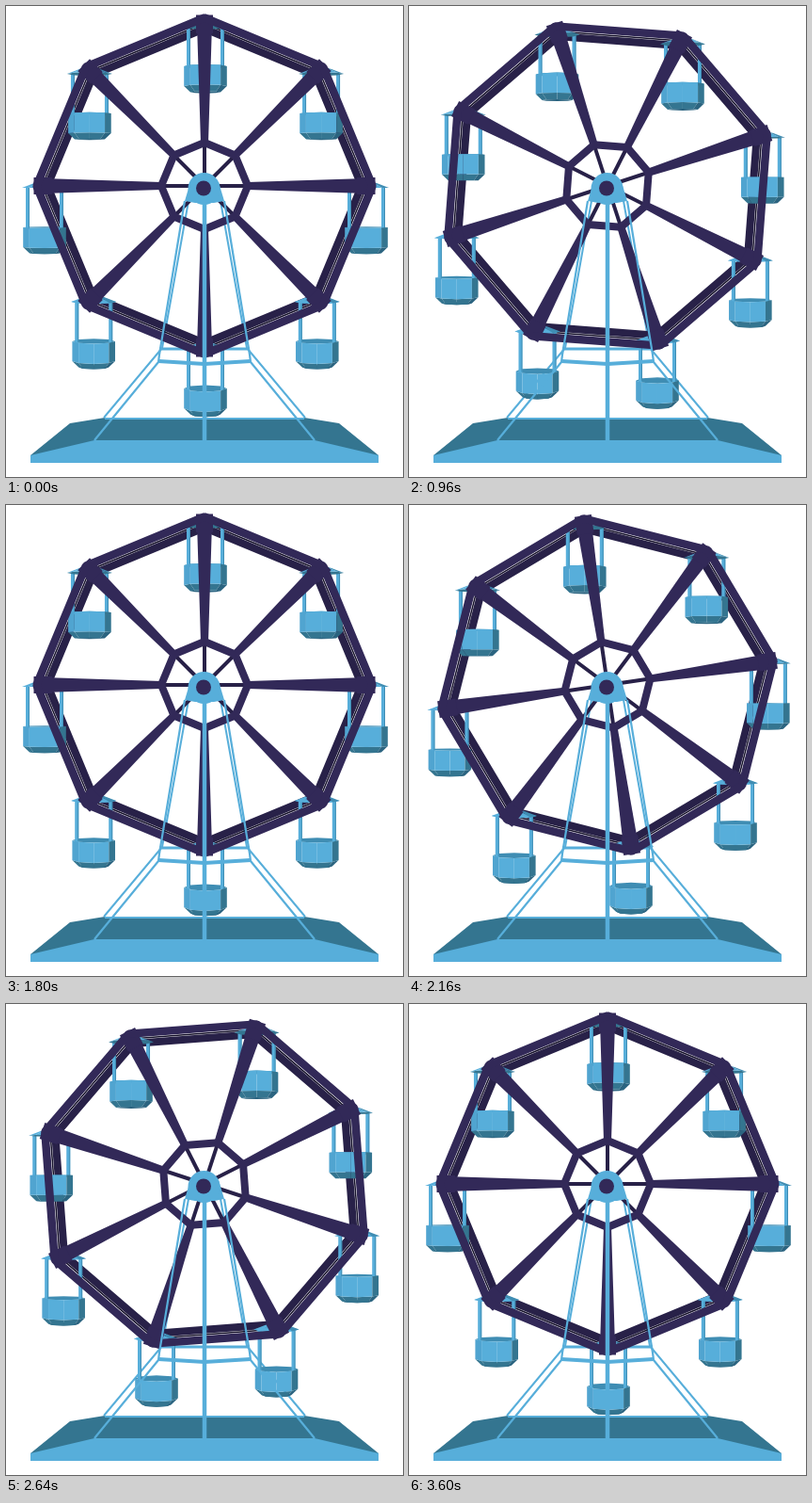
These frames come from a looping animation (422 px wide and 500 px high, 3660 ms). An HTML page with a canvas:

```html
<!DOCTYPE html>
<html lang="en">
<head>
<meta charset="utf-8">
<title>Ferris wheel</title>
<style>
  html, body { margin: 0; width: 100%; height: 100%; overflow: hidden; background: #fff; }
  canvas { display: block; }
</style>
</head>
<body>
<canvas id="stage" width="422" height="500"></canvas>
<script>
const ctx = document.getElementById('stage').getContext('2d');
const LOOP = 3660, STEP = 60, TURN = 3600;
const CX = 211, CY = 191, EYE = 192, DEPTH = 1400;
const PURPLE = '#322958', SHADE = '#282148', INK = '#15112a';
const SKY = '#57aeda', SIDE = '#50a4d0', TEAL = '#347590', DEEP = '#2b6480', INNER = '#3f8db3';

function trace(points, closed) {
  ctx.beginPath();
  points.forEach(([x, y]) => ctx.lineTo(x, y));
  if (closed) ctx.closePath();
}

function fill(points, color) {
  trace(points, true);
  ctx.fillStyle = color;
  ctx.fill();
}

function line(points, width, color = SKY, closed = false) {
  trace(points, closed);
  ctx.lineWidth = width;
  ctx.strokeStyle = color;
  ctx.stroke();
}

// Half outlines are given as distance from the wheel's axis and height.
const side = (half, sign) => half.map(([d, y]) => [CX + sign * d, y]);
const mirror = half => [...side(half, -1), ...side(half, 1).reverse()];
const bothSides = (half, width) => [-1, 1].forEach(sign => line(side(half, sign), width));

// Angles run clockwise from the top.
const polar = (r, a) => [CX + r * Math.sin(a), CY - r * Math.cos(a)];
const eight = fn => Array.from({ length: 8 }, (_, i) => fn(i * Math.PI / 4));
const octagon = (r, turn) => eight(a => polar(r, a + turn));

// Level octagon in slight perspective; its first five points face the viewer.
function ring(x, y, r) {
  const tilt = (y - EYE) / DEPTH;
  return eight(a => [x - r * Math.cos(a), y + r * Math.sin(a) * tilt]);
}

function walls(upper, lower, colors) {
  colors.forEach((color, i) => fill([upper[i], upper[i + 1], lower[i + 1], lower[i]], color));
}

function gondola(x, y) {
  const top = ring(x, y - 13, 22.8);
  const middle = ring(x, y + 8, 22.8);
  const bottom = ring(x, y + 14.5, 16);
  const roof = ring(x, y - 55, 24);
  const dome = ring(x, y - 60, 11);

  fill(bottom, DEEP);
  fill(top, INNER);
  for (const dx of [-18, 18]) {
    line([[x + dx, y - 55], [x + dx, y - 11]], 4);
    line([[x + dx + 1.5, y - 55], [x + dx + 1.5, y - 12]], 1, INNER);
  }
  walls(middle, bottom, [TEAL, TEAL, TEAL, DEEP]);
  walls(top, middle, [SIDE, SKY, SKY, TEAL]);

  fill(roof, y - 55 < EYE ? TEAL : SKY);
  fill(dome, SKY);
  walls(dome, roof, [SKY, SKY, SKY, INNER]);
}

// Cabins hang below their pivots and spread a little wider near the top.
function cabins(turn) {
  eight(a => {
    const [s, c] = [Math.sin(a + turn), Math.cos(a + turn)];
    gondola(CX + 1 + 171 * s * (1 + 0.025 * c), 248 - 171 * c);
  });
}

function base() {
  fill(mirror([[185, 477], [143, 443], [106, 437]]), TEAL);
  fill(mirror([[185, 485], [185, 477], [117, 461]]), SKY);
}

function backFrame() {
  line(mirror([[106, 438]]), 2);
  line(mirror([[48, 364]]), 3);
  bothSides([[17, 207], [45, 363], [107, 437]], 2);
}

function backWheel(turn) {
  eight(a => line([[CX, CY], polar(165, a + turn)], 4, SHADE));
  line(octagon(167, turn), 8, SHADE, true);
  line(octagon(172.5, turn), 1.5, INK, true);
}

function frontWheel(turn) {
  eight(a => {
    const [s, c] = [Math.sin(a + turn), Math.cos(a + turn)];
    const at = (r, w) => [CX + r * s + w * c, CY - r * c + w * s];
    fill([at(46, -4), at(172, -8), at(172, 8), at(46, 4)], PURPLE);
    line([at(162, 0), at(181.5, 0)], 18, PURPLE);
  });
  line(octagon(178.5, turn), 8.5, PURPLE, true);
  line(octagon(46, turn), 8, PURPLE, true);
}

function disc(x, y, r, color) {
  ctx.beginPath();
  ctx.arc(x, y, r, 0, 2 * Math.PI);
  ctx.fillStyle = color;
  ctx.fill();
}

function frontFrame() {
  bothSides([[21, 207], [48, 370], [49, 378], [117, 461]], 2.2);
  line([[162, 377], [CX, 380], [260, 377]], 4);
  line([[CX, 205], [CX, 461]], 4.5);
  fill(mirror([[15, 187], [21, 207], [10, 209]]), SKY);
  disc(210.5, 194, 17, SKY);
  disc(210, 193.5, 8, PURPLE);
}

function draw() {
  const time = Math.floor(performance.now() % LOOP / STEP) * STEP;
  const p = time / TURN;
  const turn = -2 * Math.PI * p * p * (3 - 2 * p);

  ctx.clearRect(0, 0, 422, 500);
  ctx.lineJoin = 'bevel';
  base();
  backFrame();
  backWheel(turn);
  cabins(turn);
  frontWheel(turn);
  frontFrame();
  requestAnimationFrame(draw);
}
draw();
</script>
</body>
</html>
```
